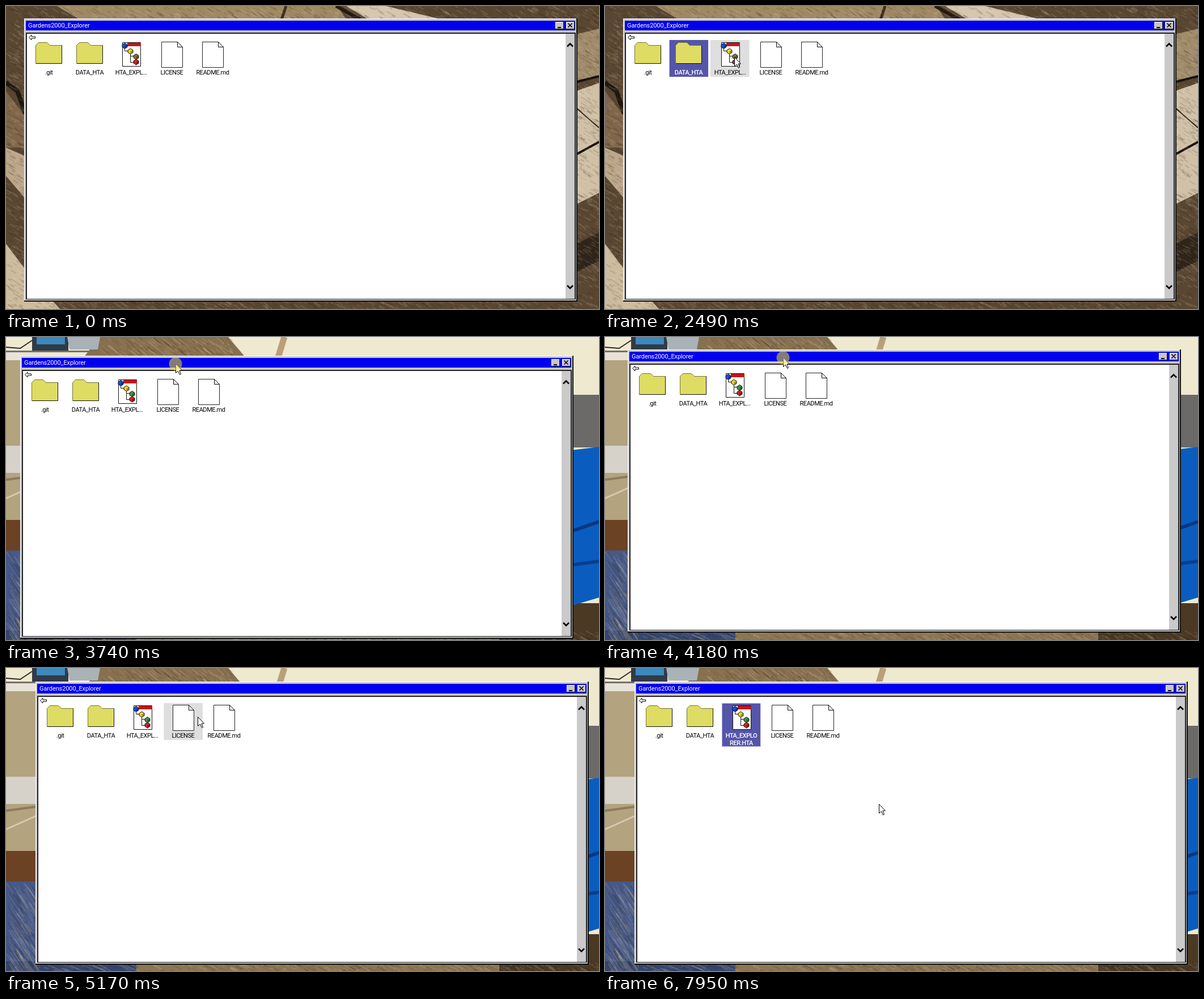
Write an HTML page with a canvas that moves like this. It is 1046 px wide and 535 px high and loops after 8000 ms.

```html
<!DOCTYPE html>
<html lang="en">
<head>
<meta charset="utf-8">
<title>File explorer</title>
<style>
  html, body { margin: 0; width: 100%; height: 100%; overflow: hidden; background: #3a2d20; }
  canvas { display: block; }
</style>
</head>
<body>
<canvas id="stage" width="1046" height="535"></canvas>
<script>
const W = 1046, H = 535, LOOP = 8000;
const ctx = document.getElementById('stage').getContext('2d');

// Pointer path: [time, x, y]; the window follows it while it is held
const PATH = [
  [470, 2, 324], [1240, 100, 92], [2100, 150, 98], [2490, 228, 90], [2850, 292, 97],
  [3200, 296, 68], [3400, 306, 36], [3740, 299, 47], [3890, 338, 51], [4180, 314, 36],
  [4570, 326, 38], [4730, 326, 38], [5170, 338, 86], [5400, 330, 98], [5680, 330, 98], [6020, 483, 240]
];
const GRAB = 3400, DROP = 4730;
const CLICKS = [1880, 2560, 2850, GRAB, 5630];
const LEFT_KEYS = [7030, 7340, 7570], RIGHT_KEYS = [7800, 7950];

const CELL = { x: 41.2, y: 60, step: 72.4, w: 68.5, h: 65 };
const FILES = [
  { name: ['.git'], icon: folder },
  { name: ['DATA_HTA'], icon: folder },
  { name: ['HTA_EXPL...'], full: ['HTA_EXPLO', 'RER.HTA'], icon: app },
  { name: ['LICENSE'], icon: page },
  { name: ['README.md'], icon: page }
];

function pointerAt(t) {
  const i = PATH.findIndex(p => p[0] > t);
  if (i < 1) return PATH[i ? PATH.length - 1 : 0].slice(1);
  const [t0, x0, y0] = PATH[i - 1], [t1, x1, y1] = PATH[i];
  const k = (t - t0) / (t1 - t0);
  return [x0 + (x1 - x0) * k, y0 + (y1 - y0) * k];
}

function offsetAt(t) {
  if (t < GRAB) return [0, 0];
  const [gx, gy] = pointerAt(GRAB), [x, y] = pointerAt(Math.min(t, DROP));
  return [Math.round(x - gx), Math.round(y - gy)];
}

// Index of the file under the pointer, or -1
function fileUnder(t) {
  const [x, y] = pointerAt(t), [dx, dy] = offsetAt(t);
  const col = (x - dx - CELL.x) / CELL.step, row = y - dy - CELL.y;
  const i = Math.floor(col);
  const inside = row >= 0 && row < CELL.h && (col - i) * CELL.step < CELL.w;
  return t >= PATH[0][0] && inside && i < FILES.length ? i : -1;
}

function selectedAt(t) {
  const past = list => list.filter(s => s <= t);
  const last = past(CLICKS).pop();
  return last ? fileUnder(last) - past(LEFT_KEYS).length + past(RIGHT_KEYS).length : -1;
}

function rect(c, color, x, y, w, h) {
  c.fillStyle = color;
  c.fillRect(x, y, w, h);
}

function trace(c, pts) {
  c.beginPath();
  for (let i = 0; i < pts.length; i += 2) c.lineTo(pts[i], pts[i + 1]);
}

function shape(c, pts, fill, line) {
  trace(c, pts);
  c.closePath();
  c.fillStyle = fill;
  c.fill();
  if (line) { c.strokeStyle = line; c.lineWidth = 1; c.stroke(); }
}

function stroke(c, pts, color, width) {
  trace(c, pts);
  c.strokeStyle = color;
  c.lineWidth = width;
  c.stroke();
}

function layer(paint) {
  const cv = document.createElement('canvas');
  cv.width = W;
  cv.height = H;
  paint(cv.getContext('2d'));
  return cv;
}

let seed = 7;
function rnd() {
  seed = (seed * 16807) % 2147483647;
  return seed / 2147483647;
}

// Seeded light and dark strokes over a box, about one per 40 square pixels
function grain(c, x, y, w, h, size, slope) {
  c.save();
  c.beginPath();
  c.rect(x, y, w, h);
  c.clip();
  for (let n = w * h / 40; n > 0; n--) {
    const px = x + rnd() * w, py = y + rnd() * h, l = size * (0.4 + rnd());
    const tone = rnd() < 0.5 ? '40,28,16' : '235,220,190';
    stroke(c, [px, py, px + l, py + l * slope], `rgba(${tone},.13)`, 1 + rnd() * 2);
  }
  c.restore();
}

const sepia = layer(c => {
  rect(c, '#5a4732', 0, 0, W, H);
  // cloth at the top
  shape(c, [90, 0, 585, 0, 600, 24, 130, 24], '#a08863');
  shape(c, [600, 0, 670, 0, 770, 24, 640, 24], '#d5c6ad');
  stroke(c, [582, 0, 625, 24], '#251b13', 6);
  stroke(c, [494, 0, 486, 24], '#3d2e1f', 5);
  // left edge
  shape(c, [0, 150, 34, 195, 34, 250, 0, 250], '#80664a');
  shape(c, [0, 250, 34, 265, 34, 340, 0, 300], '#bda78a');
  shape(c, [0, 420, 34, 465, 95, H, 0, H], '#cdbb9e');
  stroke(c, [0, 135, 20, 150, 34, 190], '#20170f', 8);
  // right edge
  shape(c, [1006, 50, W, 40, W, 124, 1006, 134], '#a08c6b');
  shape(c, [1006, 150, W, 136, W, 330, 1006, 350], '#d0c0a6');
  shape(c, [1006, 420, W, 400, W, 450, 1006, 470], '#30251a');
  stroke(c, [1006, 134, W, 124], '#17110c', 4);
  stroke(c, [1006, 262, W, 240], '#17110c', 4);
  stroke(c, [1006, 180, W, 215], '#281d14', 2);
  grain(c, 0, 0, W, H, 9, 0.6);
});

const room = layer(c => {
  rect(c, '#efe9cf', 0, 0, W, H);
  // cat fur at the top and bottom
  shape(c, [165, 0, 392, 0, 430, 45, 130, 45], '#87704f');
  rect(c, '#8d7652', 200, 518, 670, 17);
  rect(c, '#4b3924', 870, 470, 176, 65);
  grain(c, 165, 0, 235, 45, 14, 0.8);
  grain(c, 200, 518, W, 17, 12, 0.5);
  stroke(c, [491, 0, 480, 36], '#b8a07a', 11);
  // monitor and glass
  rect(c, '#303a48', 46, 0, 64, 24);
  rect(c, '#3d88bd', 54, 0, 50, 13);
  shape(c, [108, 0, 166, 0, 162, 22, 112, 22], '#a9b2b7');
  stroke(c, [0, 18, 25, 20, 46, 6], '#2b2926', 2);
  // shelf, papers, wood
  rect(c, '#e8e3d6', 0, 24, 60, 17);
  rect(c, '#75706a', 0, 24, 165, 3);
  rect(c, '#b3a37f', 0, 41, 60, 282);
  rect(c, '#d6d2c9', 0, 192, 60, 48);
  stroke(c, [0, 252, 60, 244], '#8c7b60', 4);
  stroke(c, [0, 285, 60, 258], '#d7c9b0', 3);
  rect(c, '#6b4223', 0, 323, 60, 54);
  // bedding
  rect(c, '#465988', 0, 377, 60, 158);
  rect(c, '#34456f', 0, 518, 230, 17);
  grain(c, 0, 377, 60, 158, 20, 1.5);
  grain(c, 60, 518, 170, 17, 20, 0.4);
  // couch and blue cloth
  rect(c, '#6c6a69', 996, 102, 50, 93);
  shape(c, [996, 200, W, 194, W, 460, 996, 475], '#0a5dbf');
  stroke(c, [1000, 342, W, 326], '#033782', 6);
  stroke(c, [1000, 402, W, 396], '#063f8e', 6);
});

function label(text, x, y, color, weight = 400, spacing = -0.45) {
  ctx.font = weight + ' 11px Roboto, sans-serif';
  ctx.letterSpacing = spacing + 'px';
  ctx.fillStyle = color;
  ctx.fillText(text, x, y);
}

// Icons are drawn relative to the left edge of their cell
function folder() {
  shape(ctx, [11.5, 101.5, 11.5, 69.5, 16.5, 64.5, 31.5, 64.5, 36.5, 69.5, 57.5, 69.5, 57.5, 101.5],
    '#dedc62', '#77742c');
  stroke(ctx, [12, 101.5, 57.5, 101.5, 57.5, 69.5], '#111', 1);
}

function page() {
  shape(ctx, [16.5, 63.5, 44.5, 63.5, 53.5, 72.5, 53.5, 108.5, 16.5, 108.5], '#fff', '#222');
  shape(ctx, [44.5, 63.5, 44.5, 72.5, 53.5, 72.5], '#eee', '#111');
}

function cube(x, y, color) {
  shape(ctx, [x - 4.5, y - 2, x, y - 5, x + 4.5, y - 2, x + 4.5, y + 2, x, y + 5, x - 4.5, y + 2], color, '#111');
  shape(ctx, [x, y, x + 4, y - 2, x + 4, y + 2, x, y + 4], 'rgba(0,0,0,.35)');
}

function app(t) {
  shape(ctx, [19.5, 64.5, 51.5, 64.5, 51.5, 106.5, 19.5, 106.5], '#fff', '#111');
  rect(ctx, '#c4151b', 28, 65, 24, 6);
  stroke(ctx, [23.5, 74, 23.5, 79.5, 33.5, 79.5, 33.5, 99.5, 41, 99.5], '#111', 1);
  stroke(ctx, [33.5, 88.5, 41, 88.5], '#111', 1);
  const colors = ['#1450dc', '#f2d722', t < 3300 ? '#8a7130' : '#3f9440', '#dc2020'];
  colors.forEach((color, i) => cube(Math.min(23.5 + i * 10, 43.5), 70.5 + i * 9.5, color));
}

function bevel(x, y, w, h, edge) {
  rect(ctx, '#111', x, y, w, h);
  rect(ctx, '#fff', x, y, w - edge, h - edge);
  rect(ctx, '#c6c6c6', x + 1, y + 1, w - edge - 1, h - edge - 1);
}

function chevron(y, dir) {
  stroke(ctx, [990, y + 2.5 * dir, 995, y - 2.5 * dir, 1000, y + 2.5 * dir], '#000', 2.6);
}

function frame() {
  bevel(32, 22, 976, 500, 2);
  rect(ctx, '#0000ee', 35, 26, 969, 17);
  rect(ctx, '#222', 35, 47, 970, 471);
  rect(ctx, '#fff', 37, 49, 950, 468);
  rect(ctx, '#cacaca', 987, 49, 16, 468);
  ctx.textAlign = 'left';
  label('Gardens2000_Explorer', 39, 38, '#fff', 400, -0.1);
  bevel(969, 28, 15, 13, 1);
  bevel(988, 28, 15, 13, 1);
  rect(ctx, '#000', 973, 37, 6, 2);
  stroke(ctx, [991.5, 30.5, 998.5, 37.5], '#000', 1.6);
  stroke(ctx, [998.5, 30.5, 991.5, 37.5], '#000', 1.6);
  chevron(69, 1);
  chevron(496, -1);
  shape(ctx, [40.5, 55.5, 45, 51, 45, 54, 51.5, 54, 51.5, 57, 45, 57, 45, 60], '#fff', '#000');
}

function files(t) {
  const chosen = selectedAt(t), hovered = fileUnder(t);
  ctx.textAlign = 'center';
  FILES.forEach((file, i) => {
    const x = CELL.x + i * CELL.step, on = i === chosen;
    const lines = on && file.full || file.name;
    const h = CELL.h + 12 * (lines.length - 1);
    if (on || i === hovered) rect(ctx, on ? '#5555aa' : '#dedede', x, CELL.y, CELL.w, h);
    ctx.save();
    ctx.translate(Math.floor(x), 0);
    if (on && t >= LEFT_KEYS[0]) {
      ctx.setLineDash([1, 1]);
      ctx.lineWidth = 1;
      ctx.strokeStyle = '#fff';
      ctx.strokeRect(0.5, CELL.y + 0.5, 68, h - 1);
      ctx.setLineDash([]);
    }
    file.icon(t);
    lines.forEach((s, n) => label(s, 34.5, 121 + n * 13, on ? '#fff' : '#000', on ? 500 : 400));
    ctx.restore();
  });
}

function pointer(t) {
  const [x, y] = pointerAt(t);
  const held = t >= GRAB && t < DROP || CLICKS.some(s => t >= s && t < s + 90);
  ctx.save();
  ctx.translate(Math.round(x) + 0.5, Math.round(y) + 0.5);
  shape(ctx, [0, 0, 0, 16, 4, 12.5, 7, 19, 9, 18, 6.5, 11.5, 11, 11.5], '#fff', '#000');
  if (held) {
    ctx.beginPath();
    ctx.arc(-0.5, 0, 11.5, 0, Math.PI * 2);
    ctx.fillStyle = 'rgba(238,222,40,.55)';
    ctx.fill();
  }
  ctx.restore();
}

function draw(t) {
  ctx.drawImage(sepia, 0, 0);
  ctx.globalAlpha = Math.min(1, Math.max(0, (t - 2700) / 950));
  ctx.drawImage(room, 0, 0);
  ctx.globalAlpha = 1;

  ctx.save();
  ctx.translate(...offsetAt(t));
  frame();
  files(t);
  ctx.restore();
  if (t >= PATH[0][0]) pointer(t);
}

const start = performance.now();
function tick() {
  draw((performance.now() - start) % LOOP);
  requestAnimationFrame(tick);
}
tick();
</script>
</body>
</html>
```
